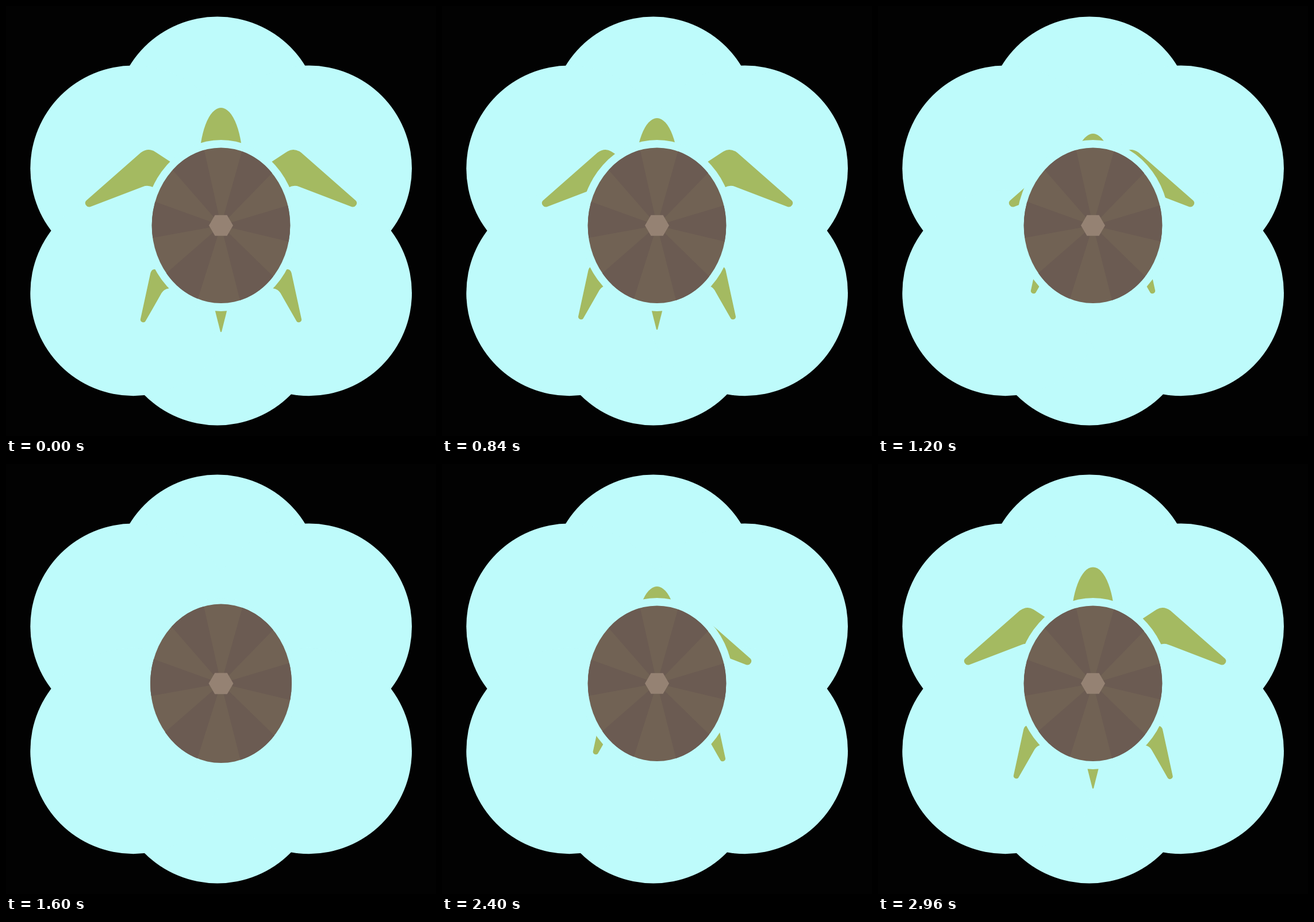
Recreate the animation shown at these times as an HTML page. Size 748 by 748 pixels, loop 3000 ms.

```html
<!DOCTYPE html>
<html lang="en">
<head>
<meta charset="utf-8">
<title>Turtle</title>
<style>
  html, body { margin: 0; width: 100%; height: 100%; overflow: hidden; background: #020202; }
  svg { display: block; width: 100vw; height: 100vh; }
  .water { fill: #befbfb; }
  .skin { fill: #a4ba61; }
  .skin use { stroke: #a4ba61; stroke-width: 1.4; stroke-linejoin: round; }
</style>
</head>
<body>
<svg viewBox="0 0 748 748">
  <defs>
    <path id="flipper" d="M140 339 L235 255.500 Q247 247 258 253.500 L300 281 L290 330 L257 315 Q247 310 238 313.500 L146.500 348.500 A6 6 0 0 1 140 339Z"/>
    <path id="leg" d="M234.500 545.500 L252 465 Q254 457.500 260 459 L285 470 L295 487 L283 490.500 Q274 492 270 499 L242 548 A4.200 4.200 0 0 1 234.500 545.500Z"/>
    <circle id="puff" r="179.200"/>
  </defs>

  <g class="water">
    <rect x="222" y="198" width="305" height="352"/>
    <use href="#puff" x="367.700" y="197.700"/>
    <use href="#puff" x="367.700" y="550.200"/>
    <use href="#puff" x="221.500" y="282.800"/>
    <use href="#puff" x="221.500" y="499"/>
    <use href="#puff" x="526.800" y="282.800"/>
    <use href="#puff" x="526.800" y="499"/>
  </g>

  <g class="skin">
    <g id="head"><ellipse cx="374" cy="277" rx="38" ry="100"/></g>
    <g id="tail"><path d="M362 523 H386 L375.200 566 Q374 568.500 372.800 566Z"/></g>
    <g id="armL"><use href="#flipper"/></g>
    <g id="legL"><use href="#leg"/></g>
    <g transform="translate(748) scale(-1 1)">
      <g id="armR"><use href="#flipper"/></g>
      <g id="legR"><use href="#leg"/></g>
    </g>
  </g>

  <!-- gap of water that swallows the limbs -->
  <ellipse class="water" cx="374" cy="382" rx="133.200" ry="149"/>

  <g id="shell">
    <ellipse rx="120.300" ry="135.300" fill="#716254"/>
    <path id="wedges" fill="#6b5b52"/>
    <path d="M-21 0 L-10.500 -18 H10.500 L21 0 L10.500 18 H-10.500Z" fill="#958273"/>
  </g>
</svg>

<script>
const LOOP = 3000, STEP = 40, HIDDEN = 1400;
const RX = 120.3, RY = 135.3;
const $ = id => document.getElementById(id);

// Point where the nth spoke meets the shell's edge; spokes lean slightly upward
function rim(n) {
  const even = (15 + 30 * n) * Math.PI / 180;
  const a = even + 0.028 - 0.058 * Math.sin(even);
  const x = Math.sin(a), y = -Math.cos(a);
  const r = 1 / Math.hypot(x / RX, y / RY);
  return `${x * r} ${y * r}`;
}

let wedges = '';
for (let n = 0; n < 12; n += 2) {
  wedges += `M0 0 L${rim(n)} A${RX} ${RY} 0 0 1 ${rim(n + 1)}Z`;
}
$('wedges').setAttribute('d', wedges);

const clamp = v => Math.min(1, Math.max(0, v));
const ramp = (t, from, to) => clamp((t - from) / (to - from));

// Slides in under the shell from `leave`, and out again from `back`
const slide = (leave, back) => t =>
  t < back ? ramp(t, leave, HIDDEN) : 1 - ramp(t, back, LOOP);

// Comes out fast, then slows down
const quickSlide = t => t < 2000
  ? ramp(t, 800, HIDDEN)
  : 1 - 0.56 * ramp(t, 2000, 2400) - 0.44 * ramp(t, 2400, LOOP);

const limbs = [
  { id: 'head', dx: 0, dy: 60, hidden: slide(600, 2000) },
  { id: 'tail', dx: 0, dy: -60, hidden: slide(800, 2000) },
  { id: 'armL', dx: 120, dy: 0, hidden: slide(600, 2600) },
  { id: 'armR', dx: 120, dy: 0, hidden: slide(1000, 2000) },
  { id: 'legL', dx: 48, dy: -75, hidden: slide(800, 2000) },
  { id: 'legR', dx: 48, dy: -75, hidden: quickSlide }
];

function draw(t) {
  for (const { id, dx, dy, hidden } of limbs) {
    const k = hidden(t);
    $(id).setAttribute('transform', `translate(${dx * k} ${dy * k})`);
  }
  const pulse = 1 + 0.11 * clamp(1 - Math.abs(t - 1760) / 200);
  $('shell').setAttribute('transform', `translate(374 381.8) scale(${pulse})`);
}

const start = performance.now();
function tick() {
  const t = (performance.now() - start) % LOOP;
  draw(Math.floor(t / STEP) * STEP);
  requestAnimationFrame(tick);
}
tick();
</script>
</body>
</html>
```
